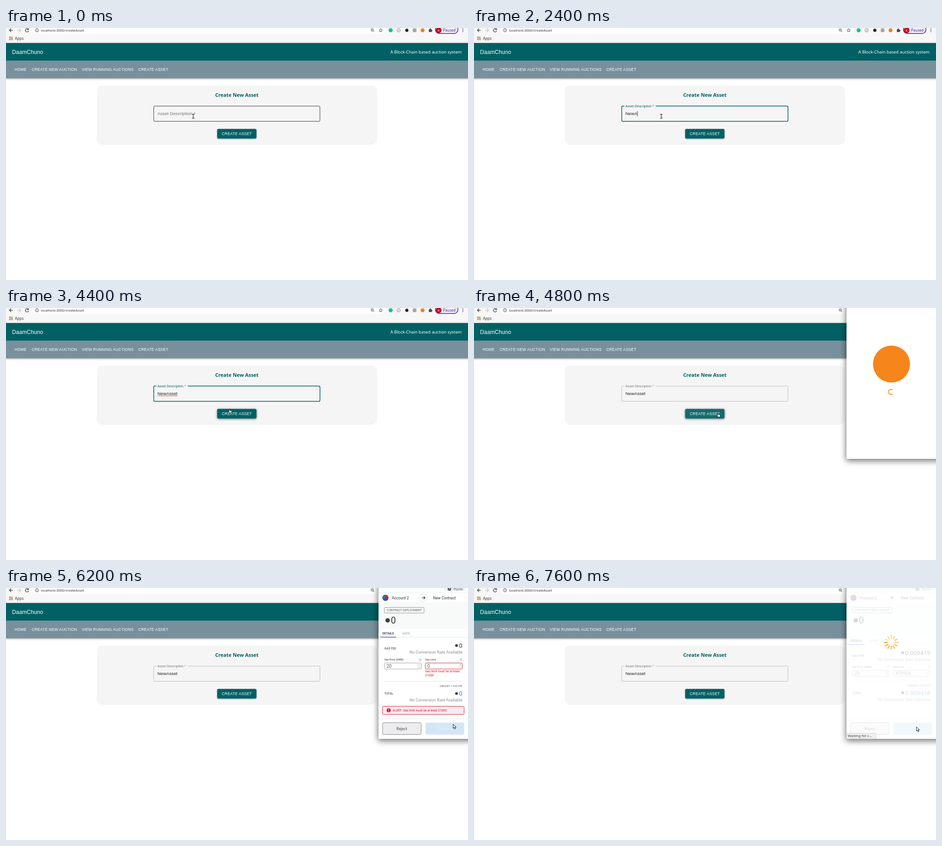
An HTML page for the animation above (8 s loop, 1012 px wide and 553 px high).

```html
<!DOCTYPE html>
<html lang="en">
<head>
<meta charset="utf-8">
<title>Create asset</title>
<style>
  html, body { margin: 0; width: 100%; height: 100%; overflow: hidden; background: #fff; }
  svg { display: block; width: 100vw; height: 100vh; }
  text { white-space: pre; }
  .ui { font-family: "Noto Sans", sans-serif; }
  .app { font-family: "Liberation Sans", Arial, sans-serif; }
  .wallet { font-family: Roboto, sans-serif; }
  .bar { filter: drop-shadow(0 1.5px 2px rgba(0,0,0,.4)); }
  .rest { filter: drop-shadow(0 1.2px 1.4px rgba(0,0,0,.4)); }
  .hover { filter: drop-shadow(0 1.8px 2.4px rgba(0,0,0,.55)); }
</style>
</head>
<body>
<svg id="stage" viewBox="0 0 1012 553" xmlns="http://www.w3.org/2000/svg"></svg>
<script>
const TEAL = '#006064', RED = '#d9101c', LOOP = 8000;
const stage = document.getElementById('stage');

// Markup helpers
const text = (x, y, str, size, fill, font, extra = '') =>
  `<text x="${x}" y="${y}" font-size="${size}" fill="${fill}" class="${font}" ${extra}>${str}</text>`;
const rect = (x, y, w, h, fill, extra = '') =>
  `<rect x="${x}" y="${y}" width="${w}" height="${h}" fill="${fill}" ${extra}/>`;
const dot = (x, y, r, fill, extra = '') =>
  `<circle cx="${x}" cy="${y}" r="${r}" fill="${fill}" ${extra}/>`;
const line = (d, stroke, width = 1, extra = '') =>
  `<path d="${d}" fill="none" stroke="${stroke}" stroke-width="${width}" ${extra}/>`;
const group = (id, body, extra = '') => `<g id="${id}" ${extra}>${body}</g>`;
const END = 'text-anchor="end"', MID = 'text-anchor="middle"', MEDIUM = 'font-weight="500"';

function browserBar() {
  const ink = '#45494d';
  let s = rect(0, 0, 1012, 33, '#f7f7f7') + rect(57, -14, 776, 27, '#fff', 'rx="12"');
  s += line('M14.5 5H7.5M11 1.5L7.5 5L11 8.5', ink, 1.3);
  s += line('M24.5 5H32M28.5 1.5L32 5L28.5 8.5', '#b8babc', 1.2);
  s += line('M48.6 2.7A3.6 3.6 0 1 0 49.4 6M49.4 .8V3.6H46.4', ink, 1.3);
  s += dot(67.8, 5, 3.6, 'none', `stroke="${ink}"`) + line('M67.8 4.4V7M67.8 2.6V3.5', ink);
  s += text(76.5, 8, 'localhost:3000/createAsset', 7.5, '#333', 'ui');
  const hues = ['#d93025', '#e8710a', '#1e8e3e'];
  for (let i = 0; i < 9; i++)
    s += rect(7 + i % 3 * 2.8, 19 + Math.floor(i / 3) * 2.8, 1.9, 1.9, hues[(i * 2 + Math.floor(i / 3)) % 3]);
  s += text(19.5, 26, 'Apps', 8.1, '#333', 'ui');
  s += dot(802.2, 4.2, 2.7, 'none', `stroke="${ink}"`) + line('M804.2 6.2L806.7 8.8M801 4.2H803.4', ink);
  const star = Array.from({ length: 10 }, (_, i) => {
    const a = i * Math.PI / 5, r = i % 2 ? 1.8 : 4.1;
    return `${(820.8 + r * Math.sin(a)).toFixed(2)},${(5.3 - r * Math.cos(a)).toFixed(2)}`;
  });
  s += `<polygon points="${star.join(' ')}" fill="none" stroke="${ink}" stroke-width=".9"/>`;
  s += dot(842.5, 5, 4.5, '#15c39a');
  s += dot(860, 5, 3.7, 'none', 'stroke="#8a8a8a"') + line('M858 7L862.5 2.8', '#8a8a8a');
  s += dot(878, 5, 3.5, '#222');
  s += rect(892, 2, 6, 6, 'none', 'stroke="#666"') + line('M895 1.5V8.5M891.5 5H898.5', '#666');
  s += dot(912.5, 5, 4.3, '#e8821e');
  s += rect(926.2, 3, 6.4, 5.8, ink, 'rx=".6"') + dot(929.3, 2.4, 1.4, ink) + dot(932.8, 5.9, 1.4, ink);
  s += rect(940.5, -5, 49.5, 17, '#f4f1fd', 'rx="8.5" stroke="#4c14b4" stroke-width="1.5"');
  s += dot(947.7, 5, 6.2, '#c80010') + text(947.7, 7.6, 'K', 7, '#fff', 'wallet', MID);
  s += text(957.5, 8, 'Paused', 8, '#3c1fa0', 'ui');
  for (const y of [2, 5, 8]) s += dot(1000.7, y, .95, ink);
  return s;
}

function page() {
  const caps = 'letter-spacing=".24"';
  let s = group('head', rect(-6, 33, 1024, 77.3, '#78909c'), 'class="bar"');
  s += rect(0, 33, 1012, 38.5, TEAL);
  s += text(13.2, 57, 'DaamChuno', 12, '#fff', 'app', 'letter-spacing=".09"');
  s += text(998, 56, 'A Block-Chain based auction system', 9.25, '#fff', 'ui', END);
  const links = [[19, 'HOME'], [56.3, 'CREATE NEW AUCTION'], [166, 'VIEW RUNNING AUCTIONS'], [289.7, 'CREATE ASSET']];
  for (const [x, name] of links) s += text(x, 94, name, 8.43, '#fff', 'app', caps);
  s += rect(199, 126.5, 614, 129.5, '#f5f5f5', 'rx="12.5"');
  s += text(505.7, 151, 'Create New Asset', 10.85, TEAL, 'ui', MID + ' font-weight="700"');
  s += line('', '#222', 1, 'id="border"');
  s += text(0, 0, 'Asset Description *', 9.6, '#757575', 'app', 'id="label" letter-spacing=".09"');
  s += text(331.7, 191.4, 'Enter Asset Description', 9.6, '#9c9c9c', 'app', 'id="hint" letter-spacing=".09"');
  s += text(331.7, 191.4, '', 9.6, '#212121', 'app', 'id="value" letter-spacing=".09"');
  s += line('M332 192.8H376', '#e23b3b', .9, 'id="typo"');
  s += rect(0, 182.3, .9, 11.4, '#222', 'id="caret"');
  s += rect(462.6, 221.5, 86, 21, TEAL, 'rx="2.4" id="create"');
  s += text(505.7, 235, 'CREATE ASSET', 8.43, '#fff', 'app', MID + ' ' + caps);
  return s;
}

// Two-button stepper input
function stepper(x, y, value, stroke) {
  return rect(x + .5, y, 81, 13.2, '#fff', `rx="2" stroke="${stroke}" stroke-width=".9"`) +
    text(x + 5, y + 10.1, value, 10, '#5b5d67', 'wallet') +
    line(`M${x + 73} ${y + .5}v12.2`, '#d4d4d4', .7) +
    line(`M${x + 75.5} ${y + 5}l1.7 -1.8l1.7 1.8m0 3.4l-1.7 1.8l-1.7 -1.8`, '#666', .8);
}

function amount(y, value, fill) {
  return text(999.7, y, value, 13.2, fill, 'wallet', END) +
    dot(value.length > 1 ? 939 : 986.8, y - 4.8, 3, '#3c3c3d');
}

function details(ready) {
  const dy = ready ? 16 : 0, up = ready ? -1.5 : 0;
  const value = ready ? '0.009418' : '0', none = 'No Conversion Rate Available';
  const info = x => dot(x, 157.3, 2, 'none', 'stroke="#9b9b9b" stroke-width=".8"') + line(`M${x} 156.2V158.6`, '#9b9b9b', .7);
  let s = rect(816, 33, 196, 57 + dy, '#f8f9f9');
  s += rect(828.8, 42.5, 87, 12.5, 'none', 'rx="2" stroke="#85878c" stroke-width=".9"');
  s += text(872.3, 51.1, 'CONTRACT DEPLOYMENT', 6.5, '#5b5d67', 'wallet', MID);
  s += dot(836, 71, 4.8, '#3c3c3d') + text(843, 78, '0', 19.6, '#333', 'wallet');
  let rows = text(824.8, 101.6, 'DETAILS', 6.45, '#24292e', 'wallet', MEDIUM) + text(868.5, 101.6, 'DATA', 6.6, '#9b9b9b', 'wallet');
  rows += line('M816 108.3H1012', '#dfe2e5', .8) + line('M820 107.8H854.5', '#4a5fd0', 1.4);
  rows += text(828.8, 134.6, 'GAS FEE', 6.6, '#5b5d67', 'wallet', MEDIUM) + amount(131, value, '#333');
  rows += text(999.7, 143.8, none, 8.9, '#8c8e94', 'wallet', END);
  rows += text(828.8, 159.1, 'Gas Price (GWEI)', 5.55, '#22232c', 'wallet') + text(918.2, 159.1, 'Gas Limit', 5.55, '#22232c', 'wallet');
  rows += info(907.3) + info(996.7);
  rows += stepper(828.4, 164.6, '20', '#999') + stepper(918, 164.6, ready ? '470904' : '0', ready ? '#999' : RED);
  s += group('', rows, `transform="translate(0 ${dy})"`);
  if (!ready) {
    s += text(918.2, 185, 'Gas limit must be at least', 6.7, RED, 'wallet') + text(918.2, 193.5, '21000', 6.7, RED, 'wallet');
    s += rect(824.8, 259.6, 178.6, 17.7, '#fbeaee', `rx="2" stroke="${RED}" stroke-width=".9"`);
    s += dot(838.2, 268.4, 4.4, RED) + line('M838.2 265.6V269.2M838.2 270.1V271.2', '#fff', 1.1);
    s += text(847, 270.9, 'ALERT: Gas limit must be at least 21000', 6.65, RED, 'wallet');
  }
  s += group('', line('M828.8 204.5H1000', '#dadde0', .8) +
    text(999.7, 217.4, 'AMOUNT + GAS FEE', 5.5, '#5b5d67', 'wallet', END) +
    text(828.8, 234.4, 'TOTAL', 6.5, '#5b5d67', 'wallet', MEDIUM) + amount(236.3, value, '#2f80d8') +
    text(999.7, 249.2, none, 8.9, '#8c8e94', 'wallet', END), `transform="translate(0 ${up})"`);
  return s;
}

function wallet() {
  let s = rect(815, -30, 220, 365.5, '#000', 'opacity=".55" filter="url(#soft)"') + rect(816, 0, 196, 331, '#fff');
  s += group('splash', dot(914.5, 123, 40.5, '#f6851b') + line('M917 188.5A5.6 5.6 0 1 1 917 179.5', '#f7931e', 2, 'id="ring"'));
  let form = rect(959.5, -10, 46, 17, '#f0f1f2', 'rx="5"') + dot(971.3, 2, 3.9, '#5b5d67') + text(971.3, 4.2, '?', 6, '#fff', 'wallet', MID);
  form += text(980.3, 4.6, 'Plumb', 7.2, '#5b5d67', 'wallet');
  form += line('M816 10.5H1012M816 33H1012', '#e4e6e8', .8);
  form += dot(831.2, 21.5, 6.7, '#d8232b') + line('M831.2 21.5V14.8A6.7 6.7 0 0 0 825 24.2Z', 'none', 0, 'style="fill:#17808c"');
  form += '<path d="M831.2 21.5L837.6 23.5A6.7 6.7 0 0 1 826 25.7Z" fill="#2355c5"/>';
  form += text(845, 24.6, 'Account 2', 8.3, '#333', 'wallet') + text(985.2, 24.6, 'New Contract', 8.2, '#333', 'wallet', END);
  form += dot(914.2, 21.5, 8.6, '#fff', 'stroke="#d2d5d8" stroke-width=".9"') + line('M910.5 21.5H917.7M914.8 18.4L917.9 21.5L914.8 24.6', '#222', 1.1);
  form += group('empty', details(false)) + group('ready', details(true));
  form += line('M816 287H1012', '#dfe2e5', .8);
  form += rect(824.9, 295.7, 84.5, 25.8, '#ededee', 'rx="3" stroke="#74777c" stroke-width=".9"') + text(867, 311.7, 'Reject', 8.5, '#4c4e54', 'wallet', MID);
  form += rect(919, 295.5, 84.7, 26.2, '#d3e6f6', 'rx="3" id="confirm"') + text(961, 311.7, 'Confirm', 8.5, '#fff', 'wallet', MID + ' id="confirmText"');
  s += group('form', form);
  let rays = '';
  for (let i = 0; i < 12; i++)
    rays += `<path d="M0 -8.7V-14.8" stroke="#f3b13c" stroke-width="3" stroke-linecap="round" opacity="${(.3 + .6 * i / 11).toFixed(2)}" transform="rotate(${i * 30 - 60})"/>`;
  s += group('wait', rect(816, 0, 196, 331, '#fff', 'opacity=".8"') + group('', rays, 'transform="translate(914 119.5)"') +
    line('M816 318.5H878Q880.5 318.5 880.5 321V331H816Z', '#d0d0d0', .7, 'style="fill:#efefef"') +
    text(818.5, 327.4, 'Waiting for c…', 7.9, '#444', 'ui'));
  return group('wallet', s);
}

const outlined = 'stroke="#fff" stroke-width="1" paint-order="stroke" stroke-linejoin="round"';
function cursors() {
  const beam = 'M-2.6 -4.2H-.6L0 -3.6L.6 -4.2H2.6M0 -3.6V3.6M-2.6 4.2H-.6L0 3.6L.6 4.2H2.6';
  return group('beam', line(beam, '#fff', 2.4) + line(beam, '#222', 1.2)) +
    group('arrow', `<path d="M0 0V9.2L2.1 7.2L3.6 10.7L5.2 10L3.7 6.7H6.6Z" fill="#fff" stroke="#111" stroke-width=".95" stroke-linejoin="round"/>`) +
    group('hand', `<path d="M1 .6Q1.8 -.4 2.3 .8V3.6L6 4.6Q6.9 5 6.7 6.2L6 9.2H2.1L-.3 5.9Q-.2 4.8 1 5.6Z" fill="#fff" stroke="#111" stroke-width=".85" stroke-linejoin="round"/>`);
}

stage.innerHTML = '<defs><filter id="soft" x="-20%" y="-20%" width="140%" height="140%"><feGaussianBlur stdDeviation="7"/></filter></defs>' +
  rect(0, 0, 1012, 553, '#fff') + browserBar() + page() + wallet() + cursors();

const el = id => document.getElementById(id);
const set = (id, attrs) => { for (const k in attrs) el(id).setAttribute(k, attrs[k]); };
const show = (id, on) => set(id, { display: on ? 'inline' : 'none' });
// Latest entry whose start time has passed
const at = (keys, t) => keys.filter(k => k[0] <= t).pop();

const typing = [[0, 0, 332], [1300, 1, 338.8], [1700, 2, 344.2], [1900, 3, 351.3], [2400, 4, 357.8], [3200, 8, 376.2]];
const pointer = [[0, 'beam', 410.2, 193.6], [3800, 'beam', 416, 201.5], [4000, 'arrow', 456, 226],
  [4400, 'hand', 487.7, 221], [4800, 'hand', 532.7, 230], [5400, 'arrow', 1005, 274],
  [5800, 'arrow', 992, 293.5], [6200, 'arrow', 979.5, 298.8], [6600, 'arrow', 969.3, 304.8]];
const spin = [[0, 0], [5400, -55], [5800, 55]];
const confirmLook = [[0, '#d3e6f6', '#e9f3fb'], [6600, '#037dd6', '#fff'], [6900, '#0260a4', '#fff'], [7600, '#b5dfeb', '#b5dfeb']];

function render(t) {
  const focus = t >= 200 && t < 4800, blurred = t >= 4800;
  const step = Math.floor(t / 100) * 100;
  const lift = t < 200 ? 0 : 1 - (1 - Math.min(1, (step - 100) / 400)) ** 3;
  const start = lift ? 'M398 171.3' : 'M329.5 171.3';
  set('border', {
    d: `${start}H685.3Q687.7 171.3 687.7 173.7V202.4Q687.7 204.8 685.3 204.8H326Q323.6 204.8 323.6 202.4V173.7Q323.6 171.3 326 171.3H329.5`,
    stroke: focus ? TEAL : blurred ? '#bcbcbc' : '#333', 'stroke-width': focus ? 1.5 : 1
  });
  set('label', {
    transform: `translate(331.7 ${191 - 17.5 * lift}) scale(${1 - .25 * lift})`, fill: focus ? TEAL : '#757575'
  });

  const [, count, caretX] = at(typing, t);
  el('value').textContent = 'NewAsset'.slice(0, count);
  show('hint', !count);
  set('hint', { opacity: lift });
  show('caret', focus && t < 4000 && !(t >= 900 && t < 1300));
  set('caret', { x: caretX - .4 });
  show('typo', t >= 4400 && t < 4800);
  set('create', {
    class: t >= 4400 && t < 5400 ? 'hover' : 'rest', fill: t >= 4800 && t < 5400 ? '#126b6e' : TEAL
  });

  show('wallet', blurred);
  show('splash', t < 6200);
  show('form', t >= 6200);
  show('empty', t < 6600);
  show('ready', t >= 6600);
  show('wait', t >= 7600);
  set('ring', { transform: `rotate(${at(spin, t)[1]} 913.3 184)` });
  const [, fill, ink] = at(confirmLook, t);
  set('confirm', { fill });
  set('confirmText', { fill: ink });

  const [, kind, x, y] = at(pointer, t);
  for (const id of ['beam', 'arrow', 'hand']) show(id, id === kind);
  set(kind, { transform: `translate(${x} ${y})` });
}

const begin = performance.now();
function tick() {
  render((performance.now() - begin) % LOOP);
  requestAnimationFrame(tick);
}
tick();
</script>
</body>
</html>
```
